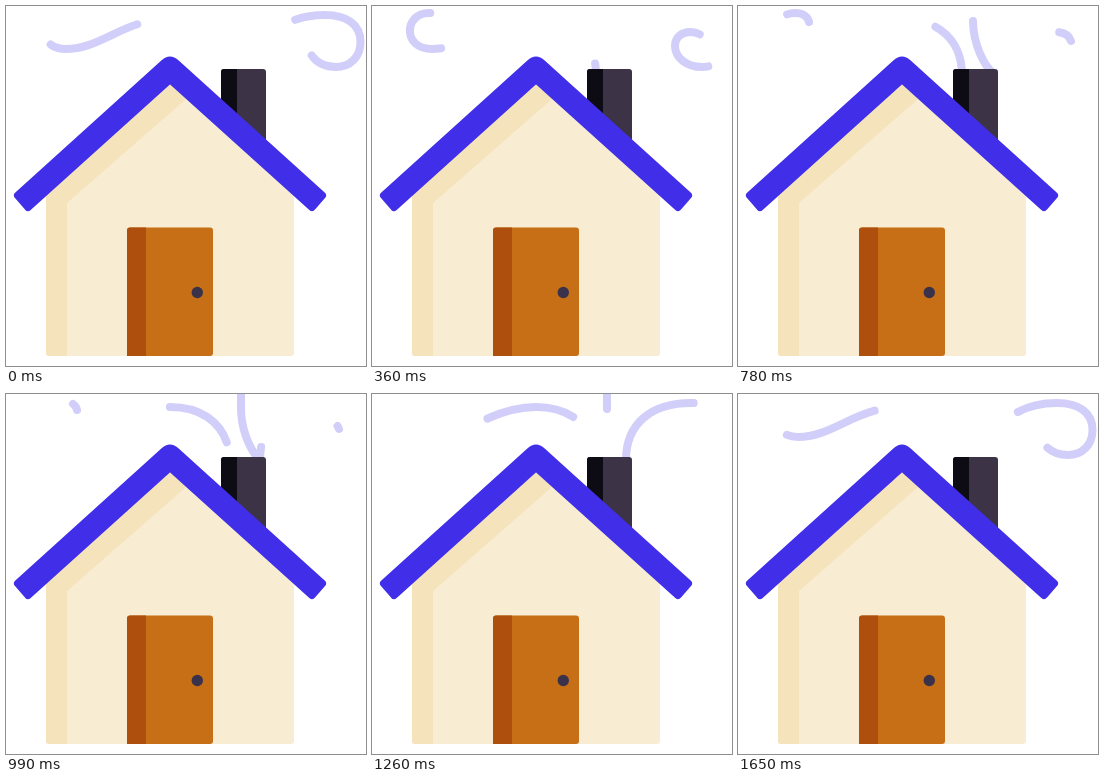
Write an HTML page that moves like this. It is 360 px wide and 360 px high and loops after 1680 ms.

```html
<!DOCTYPE html>
<html lang="en">
<head>
<meta charset="utf-8">
<title>House with chimney smoke</title>
<style>
  html, body { margin: 0; width: 100%; height: 100%; overflow: hidden; background: #fff; }
  svg { display: block; width: 100%; height: 100%; }
  #smoke { fill: none; stroke: #d1cffa; stroke-width: 8; stroke-linecap: round; }
</style>
</head>
<body>
<svg viewBox="0 0 360 360">
  <g id="smoke"></g>

  <g id="chimney">
    <path fill="#3c3347" d="M215 145V66q0-3 3-3H257q3 0 3 3V145z"/>
    <path fill="#0d0b13" d="M215 145V66q0-3 3-3H231V145z"/>
  </g>

  <g id="walls">
    <path fill="#f8edd3" d="M40 180L164 68L288 180V347q0 3-3 3H43q-3 0-3-3z"/>
    <path fill="#f5e3bc" d="M40 180L164 68V78L180 93L61 197V350H43q-3 0-3-3z"/>
  </g>

  <path id="roof" fill="#412ee8" stroke="#412ee8" stroke-width="8" stroke-linejoin="round"
    d="M12 189.500L158 57.500Q164 52 170 57.500L316 189.500L306 201L164 73L22 201z"/>

  <g id="door">
    <path fill="#c66f17" d="M121 350V224.500q0-3 3-3H204q3 0 3 3V347q0 3-3 3z"/>
    <path fill="#af4f0d" d="M121 350V224.500q0-3 3-3H140V350z"/>
    <circle cx="191.300" cy="286.500" r="5.700" fill="#39324a"/>
  </g>
</svg>

<script>
const LOOP = 1680;
const sineInOut = x => (1 - Math.cos(Math.PI * x)) / 2;
const quickOut = x => (1 - (1 - x) ** 3.2) ** 1.6;

// Each wisp's head leaves at `start`; its tail follows the same way `delay` ms later.
const wisps = [
  { start: 103, duration: 2310, delay: 510, ease: sineInOut,
    d: 'M224 66C223 38 204 13 164 13C118 13 95 43 60 43C30 43 32 7 57 7C65 7 70 11 71 16' },
  { start: 380, duration: 690, delay: 480, ease: sineInOut,
    d: 'M256 68C246 60 235 38 235 14V-20' },
  { start: 910, duration: 1620, delay: 515, ease: quickOut,
    d: 'M254 66C254 29 280 9 319 9C340 9 354.5 18 354.5 36C354.5 51 344 61 330 61' +
       'C315 61 303 52 303 40C303 31 310 26 318 26C325 26 331 29 333 35' }
];

const smoke = document.getElementById('smoke');

function addPath(d) {
  const path = document.createElementNS('http://www.w3.org/2000/svg', 'path');
  path.setAttribute('d', d);
  return smoke.appendChild(path);
}

// A wisp outlives one loop, so two generations of it can be visible together.
for (const wisp of wisps) {
  wisp.paths = [addPath(wisp.d), addPath(wisp.d)];
  wisp.length = wisp.paths[0].getTotalLength();
}

function travelled(wisp, time) {
  const x = Math.min(1, Math.max(0, (time - wisp.start) / wisp.duration));
  return wisp.length * wisp.ease(x);
}

function draw(time) {
  for (const wisp of wisps) {
    wisp.paths.forEach((path, generation) => {
      const age = time + generation * LOOP;
      const head = travelled(wisp, age);
      const tail = travelled(wisp, age - wisp.delay);
      const visible = head > 6 && tail < wisp.length;
      path.style.display = visible ? '' : 'none';
      path.style.strokeDasharray = `${Math.max(0.01, head - tail)} 999`;
      path.style.strokeDashoffset = -tail;
    });
  }
}

const begin = performance.now();
function tick() {
  draw((performance.now() - begin) % LOOP);
  requestAnimationFrame(tick);
}
tick();
</script>
</body>
</html>
```
